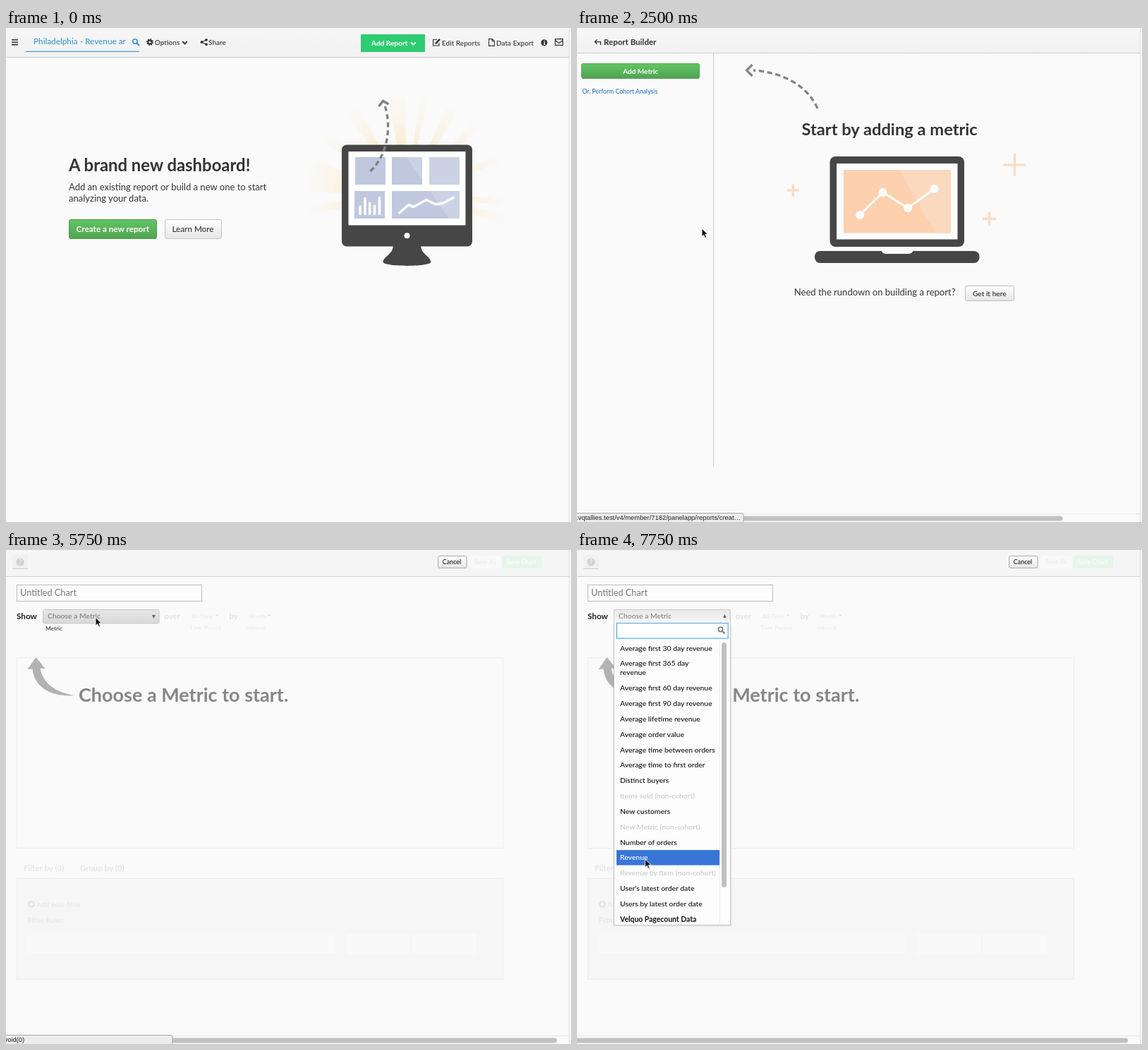
An HTML page that plays this animation: 801x700 px, repeating every 8 s.

```html
<!DOCTYPE html>
<html lang="en">
<head>
<meta charset="utf-8">
<title>Building a report</title>
<style>
html, body { margin: 0; width: 100%; height: 100%; overflow: hidden; background: #fafafa; }
svg { display: block; width: 100%; height: 100%; }
text { font-family: Lato, "Open Sans", sans-serif; }
.semi { font-weight: 500; }
.bold { font-weight: 700; }
.line { fill: none; stroke: currentColor; }
.mid { text-anchor: middle; }
.status text { font: 9.4px "Liberation Sans", Arial, sans-serif; }

.anim { animation: 8s step-end infinite; }
.dash { animation-name: dash; }
.builder { animation-name: builder; }
.chart { animation-name: chart; }
.menu { animation-name: menu; }
.hover { animation-name: hover; }
.under { animation-name: under; }
.status { animation-name: status; }
.url { animation-name: url; }
.void { animation-name: void; }
.cursor { animation-name: cursor; }
.first { animation-name: first; }
.blip { opacity: 0; animation-name: blip; animation-delay: calc((var(--s) - 32) * 250ms); }

@keyframes dash { 0% { opacity: 1 } 31.25% { opacity: 0 } }
@keyframes builder { 0% { opacity: 0 } 31.25% { opacity: 1 } 59.375% { opacity: 0 } }
@keyframes chart { 0% { opacity: 0 } 59.375% { opacity: 1 } }
@keyframes menu { 0% { opacity: 0 } 78.125% { opacity: 1 } }
@keyframes hover { 0% { opacity: 0 } 21.875% { opacity: 1 } }
@keyframes under { 0% { opacity: 0 } 50% { opacity: 1 } }
@keyframes url { 0% { opacity: 1 } 50% { opacity: 0 } }
@keyframes void { 0% { opacity: 0 } 50% { opacity: 1 } }
@keyframes first { 0% { opacity: 1 } 87.5% { opacity: 0 } }
@keyframes blip { 0% { opacity: 1 } 3.125% { opacity: 0 } }
@keyframes status {
  0% { opacity: 0 } 18.75% { opacity: .5 } 21.875% { opacity: 1 }
  37.5% { opacity: .4 } 40.625% { opacity: 0 }
  56.25% { opacity: 1 } 84.375% { opacity: .25 } 87.5% { opacity: 0 }
}
@keyframes cursor {
  0% { transform: translate(-30px, -30px) }
  6.25% { transform: translate(286px, 127px) }
  9.375% { transform: translate(258px, 172px) }
  12.5% { transform: translate(222px, 226px) }
  15.625% { transform: translate(192px, 264px) }
  18.75% { transform: translate(177px, 284px) }
  37.5% { transform: translate(172px, 268px) }
  40.625% { transform: translate(155px, 215px) }
  43.75% { transform: translate(128px, 152px) }
  46.875% { transform: translate(108px, 110px) }
  50% { transform: translate(99px, 95.5px) }
  68.75% { transform: translate(112px, 96px) }
  71.875% { transform: translate(127px, 95.5px) }
  81.25% { transform: translate(126px, 108px) }
  84.375% { transform: translate(124.5px, 124.5px) }
  87.5% { transform: translate(118px, 192px) }
  90.625% { transform: translate(108px, 302px) }
  93.75% { transform: translate(99px, 408px) }
  96.875% { transform: translate(96.5px, 438px) }
}
</style>
</head>
<body>
<svg viewBox="0 0 801 700" preserveAspectRatio="none">
  <defs>
    <linearGradient id="green" x2="0" y2="1"><stop stop-color="#62c462"/><stop offset="1" stop-color="#51a351"/></linearGradient>
    <linearGradient id="white" x2="0" y2="1"><stop stop-color="#fff"/><stop offset="1" stop-color="#e6e6e6"/></linearGradient>
    <linearGradient id="grey" x2="0" y2="1"><stop stop-color="#e6e6e6"/><stop offset="1" stop-color="#d8d8d8"/></linearGradient>
    <linearGradient id="open" x2="0" y2="1"><stop stop-color="#e8e8e8"/><stop offset="1" stop-color="#fafafa"/></linearGradient>
    <linearGradient id="bar" x2="0" y2="1"><stop stop-color="#f6f6f6"/><stop offset="1" stop-color="#f2f2f2"/></linearGradient>
    <radialGradient id="glow" gradientUnits="userSpaceOnUse" cx="0" cy="0" r="146">
      <stop offset=".5" stop-color="#fbe6c0"/><stop offset="1" stop-color="#fdf3df" stop-opacity="0"/>
    </radialGradient>
    <path id="ray" d="M0 0L150-10V10z" fill="url(#glow)"/>
    <path id="chev" d="M-3.3-1.5L0 1.8L3.3-1.5" fill="none" stroke="currentColor" stroke-width="1.9"/>
    <g id="lens" fill="none" stroke="currentColor" stroke-width="1.6"><circle cx="-1" cy="-1" r="3.2"/><path d="M1.4 1.4L5 5" stroke-width="2"/></g>
    <path id="plus" d="M-1 0H1M0-1V1" stroke="#fbdcc6" vector-effect="non-scaling-stroke" stroke-width="3.4"/>
    <clipPath id="tiles"><path d="M495 183h43v39h-43zM547 183h43v39h-43zM600 183h43v39h-43zM494 231h43v39h-43zM547 231h96v39h-96z"/></clipPath>
  </defs>

  <rect width="801" height="700" fill="#fafafa"/>

  <g class="anim dash" color="#333">
    <rect width="798" height="41" fill="url(#bar)"/>
    <path d="M0 41.5H798" stroke="#ccc"/>
    <path class="line" d="M8 16.8h9M8 20.2h9M8 23.6h9" stroke-width="1.6"/>
    <path d="M28 33.3H189" stroke="#3a9fd0" stroke-width="1.2"/>
    <text x="39" y="23.4" font-size="11.8" fill="#2c93cb">Philadelphia - Revenue ar</text>
    <use href="#lens" x="184" y="20" color="#2c93cb"/>
    <g class="line"><circle cx="204" cy="20" r="2.7" stroke-width="2.2"/><circle cx="204" cy="20" r="4.2" stroke-width="1.5" stroke-dasharray="1.7 1.6"/></g>
    <use href="#chev" x="253.5" y="20.5"/>
    <path class="line" d="M284 16.8L277.5 20L284 23.2" stroke-width="1.2"/>
    <path d="M284 16.8h0M277.5 20h0M284 23.2h0" stroke="#333" stroke-width="3.8" stroke-linecap="round"/>
    <rect x="503" y="9" width="91" height="25" fill="#2ecc71"/>
    <text class="bold" x="518" y="24.5" font-size="10.1" fill="#fff">Add Report</text>
    <use href="#chev" x="577.3" y="21.8" color="#fff"/>
    <path class="line" d="M611 16.5H605.6V25H614V21" stroke-width="1.2"/>
    <path class="line" d="M608.8 22.3L615 15.8" stroke-width="2.5"/>
    <path class="line" d="M684.6 15.6H689.4L692.4 18.6V25.4H684.6zM689.2 15.6V18.8H692.4" stroke-width="1.1"/>
    <circle cx="763" cy="20.8" r="4.5" fill="#333"/>
    <path d="M762 20h1.4v3.2M761.8 23.3h2.9M762.7 18h1.2" stroke="#fff" fill="none" stroke-width="1.1"/>
    <path class="line" d="M778.6 15.6h10.8v8.8H778.6zM778.6 17.4L784 21.4L789.4 17.4" stroke-width="1.2"/>
    <g class="semi" font-size="10.05" fill="#333">
      <text x="210.8" y="24">Options</text><text x="287" y="24">Share</text>
      <text x="618" y="24.5">Edit Reports</text><text x="695" y="24.5">Data Export</text>
    </g>

    <text class="bold" x="89" y="203" font-size="23.9" fill="#333">A brand new dashboard!</text>
    <g font-size="13.04" fill="#333">
      <text x="89" y="230">Add an existing report or build a new one to start</text>
      <text x="89" y="246.3">analyzing your data.</text>
    </g>
    <rect x="89.5" y="271.5" width="124" height="27" rx="2.5" fill="url(#green)" stroke="#4d9b4d"/>
    <rect class="anim hover" x="89.5" y="271.5" width="124" height="27" rx="2.5" fill="#51a351" stroke="#468f46"/>
    <text class="bold mid" x="151.3" y="288.8" font-size="11.7" fill="#fff">Create a new report</text>
    <rect x="225.5" y="271.5" width="80" height="27" rx="2.5" fill="url(#white)" stroke="#c4c4c4"/>
    <text class="semi mid" x="265" y="288.8" font-size="11.7" fill="#333">Learn More</text>

    <g transform="translate(568 236)" opacity=".65">
      <use href="#ray" transform="rotate(191) scale(1 2.5)"/>
      <use href="#ray" transform="rotate(171) scale(1 .7)"/>
      <use href="#ray" transform="rotate(215) scale(1 .7)"/>
      <use href="#ray" transform="rotate(237)"/>
      <use href="#ray" transform="rotate(264) scale(1 1.3)"/>
      <use href="#ray" transform="rotate(280) scale(1 .6)"/>
      <use href="#ray" transform="rotate(298) scale(1 .8)"/>
      <use href="#ray" transform="rotate(315) scale(1 .6)"/>
      <use href="#ray" transform="rotate(339) scale(1 .6)"/>
      <use href="#ray" transform="rotate(4) scale(1 .6)"/>
      <use href="#ray" transform="rotate(14) scale(1 .8)"/>
    </g>
    <path d="M549 308H588C589 322 602 323 602.5 332C598 338.5 539 338.5 534.5 332C535 323 548 322 549 308z" fill="#464646"/>
    <rect x="476" y="165.5" width="185" height="144" rx="7" fill="#464646"/>
    <rect x="485.5" y="175" width="166" height="104.5" fill="#fff"/>
    <g clip-path="url(#tiles)">
      <rect x="490" y="180" width="160" height="95" fill="#bfc8de"/>
      <path d="M568 183H650V270H628z" fill="#cbd2e3"/>
    </g>
    <g fill="none" stroke="#fff" stroke-width="3.6" stroke-linecap="round">
      <path d="M502 263.5V253M509 263.5V241.5M515.7 263.5V248M522.5 263.5V252M529.5 263.5V240.5"/>
      <path d="M557.5 262L571 250.5L577.5 253.5L596 243.5L609 250L620.5 248L634 240.5" stroke-linejoin="round"/>
    </g>
    <circle cx="568.5" cy="294.3" r="4" fill="#fff"/>
    <g class="line" color="#808080" stroke-width="3.3">
      <path d="M516.5 203C541 180 547 140 537 110" stroke-dasharray="7 4.5"/>
      <path d="M528.5 111L534.5 103.5L542.5 108"/>
    </g>
  </g>

  <g class="anim builder">
    <rect width="798" height="35" fill="url(#bar)"/>
    <path d="M0 35.5H798M193.5 36V621" stroke="#ccc"/>
    <path class="line" color="#333" d="M28.5 16.5L25.3 19.6L28.5 22.7M25.5 19.6H33.5V24" stroke-width="1.3"/>
    <text class="bold" x="38" y="24.3" font-size="11.5" fill="#333">Report Builder</text>
    <rect x="6.5" y="50.5" width="167" height="21" rx="2" fill="url(#green)" stroke="#55a555"/>
    <text class="bold mid" x="90.2" y="64.8" font-size="10" fill="#fff">Add Metric</text>
    <text x="7.5" y="93" font-size="8.7" fill="#1a6cb0">Or, Perform Cohort Analysis</text>
    <g class="anim under" fill="#124d7e">
      <text x="7.5" y="93" font-size="8.7" text-decoration="underline">Or, Perform Cohort Analysis</text>
    </g>
    <g class="line" color="#858585" stroke-width="3.3">
      <path d="M341 114C327 83 294 63 250 60" stroke-dasharray="7.5 4.5"/>
      <path d="M248.5 52L240.5 60L248.5 68"/>
    </g>
    <text class="bold" x="318.5" y="152" font-size="23.7" fill="#333">Start by adding a metric</text>
    <use href="#plus" transform="translate(620.5 194) scale(16)"/>
    <use href="#plus" transform="translate(306.3 230) scale(8.5)"/>
    <use href="#plus" transform="translate(584.5 270.5) scale(10)"/>
    <rect x="358.5" y="182" width="190.5" height="128" rx="8" fill="#464646"/>
    <rect x="368" y="192" width="171.5" height="107.5" fill="#fcfcfc"/>
    <rect x="378" y="201" width="152" height="89.5" fill="#fdd0ae"/>
    <path d="M456.5 201H530V290.5H508z" fill="#fad9be"/>
    <g fill="#fcfcfc">
      <path d="M401 265L433.5 233L469 255L506.5 228" fill="none" stroke="#fcfcfc" stroke-width="3"/>
      <circle cx="401" cy="265" r="6"/><circle cx="433.5" cy="233" r="6"/>
      <circle cx="469" cy="255" r="6"/><circle cx="506.5" cy="228" r="6"/>
    </g>
    <rect x="337" y="316" width="233.5" height="17" rx="7.5" fill="#464646"/>
    <path d="M431.5 315.5H476.5C475 319 473 320 469 320H439C435 320 433 319 431.5 315.5z" fill="#fafafa"/>
    <text x="307.8" y="379" font-size="13.04" fill="#333">Need the rundown on building a report?</text>
    <rect x="550.5" y="365.5" width="69" height="21" rx="2" fill="url(#white)" stroke="#bdbdbd"/>
    <text class="semi mid" x="584.8" y="379.8" font-size="10.2" fill="#222">Get it here</text>
    <path d="M0 688.5H798" stroke="#e6e6e6"/>
    <rect x="-10" y="691.5" width="698.5" height="7" rx="3.5" fill="#c1c1c1"/>
  </g>

  <g class="anim chart">
    <rect width="798" height="37" fill="#f5f5f5"/>
    <path d="M0 37.5H798" stroke="#d2d2d2"/>
    <rect x="9" y="7" width="22" height="19" rx="2" fill="#f0f0f0"/>
    <path d="M9 26.5H31" stroke="#ccc"/>
    <circle cx="20" cy="17" r="5.6" fill="#d2d2d2"/>
    <text class="bold mid" x="20" y="20.3" font-size="9" fill="#f4f4f4">?</text>
    <rect x="612.5" y="8.5" width="40.5" height="17" rx="2.5" fill="url(#white)" stroke="#aaa"/>
    <text class="semi mid" x="632" y="19.8" font-size="8.9" fill="#111">Cancel</text>
    <rect x="657" y="8" width="45" height="18" rx="2" fill="#f9f9f9"/>
    <text x="664" y="19.8" font-size="9" fill="#e8e8e8">Save As</text>
    <rect x="703" y="8" width="57" height="18" rx="3" fill="#e6f5ea"/>
    <text class="bold mid" x="731" y="19.8" font-size="8.7" fill="#f8fdf9">Save Chart</text>

    <rect x="15.5" y="49.5" width="262" height="23" fill="#fcfcfc" stroke="#bcbcbc"/>
    <text x="20" y="65.3" font-size="12.75" fill="#777">Untitled Chart</text>
    <text class="bold" x="15" y="98" font-size="11.7" fill="#222">Show</text>
    <rect x="52.5" y="84.5" width="164.5" height="19.5" rx="2" fill="url(#grey)" stroke="#c4c4c4"/>
    <text x="59" y="97.3" font-size="10.4" fill="#777">Choose a Metric</text>
    <path d="M207 92h5l-2.5 5z" fill="#666"/>
    <text class="semi" x="56" y="114.3" font-size="8.3" fill="#333">Metric</text>
    <g fill="#e2e2e2">
      <g class="bold" font-size="11.3"><text x="224.5" y="98">over</text><text x="316.5" y="98">by</text></g>
      <g font-size="8.4" fill="#e8e8e8">
        <text x="263" y="96.5">All-Time</text><text x="344" y="96.5">Month</text>
        <text x="260" y="112.5">Time Period</text><text x="340" y="112.5">Interval</text>
      </g>
      <path d="M296.5 91.5h5l-2.5 3zM371 91.5h5l-2.5 3z"/>
    </g>
    <rect x="15.5" y="152.5" width="689" height="270" fill="none" stroke="#eee"/>
    <path d="M42.5 152L56 168.5L48.5 167.5C52 188 69 202 98 206C68 209 40 197 37.5 168.5L30.5 169z" fill="#b2b2b2"/>
    <text class="bold" x="103" y="215" font-size="27" fill="#868686">Choose a Metric to start.</text>
    <g class="bold" font-size="11.5" fill="#e5e5e5"><text x="25" y="455">Filter by (0)</text><text x="105" y="455">Group by (0)</text></g>
    <rect x="15.5" y="465.5" width="689" height="143" fill="#f6f6f6" stroke="#ededed"/>
    <circle cx="36" cy="502" r="5" fill="#e4e4e4"/>
    <path d="M33 502h6M36 499v6" stroke="#f6f6f6" stroke-width="1.8"/>
    <g font-size="10.25" fill="#e4e4e4"><text x="43" y="506">Add new filter</text><text x="31" y="528">Filter Rules:</text></g>
    <path d="M30 546H467V571H30zM482 544H573V573H482zM575 544H667V573H575z" fill="#f9f9f9"/>
    <path d="M0 688.5H798" stroke="#e6e6e6"/>
    <rect x="-10" y="691.5" width="791" height="7" rx="3.5" fill="#c1c1c1"/>

    <g class="anim menu">
      <rect x="51" y="106" width="168.5" height="428" rx="3" fill="#000" opacity=".05"/>
      <rect x="52.5" y="84.5" width="164.5" height="22" rx="2" fill="url(#open)" stroke="#ccc"/>
      <text x="59" y="97.3" font-size="10.4" fill="#777">Choose a Metric</text>
      <path d="M207 96h5l-2.5-5z" fill="#666"/>
      <path d="M52.5 104V531.5H217.5V104" fill="#fdfdfd" stroke="#c6c6c6"/>
      <rect x="56.5" y="104" width="157.5" height="21" fill="#fff" stroke="#b4daf2" stroke-width="2.6"/>
      <rect x="56.5" y="104" width="157.5" height="21" fill="#fff" stroke="#62b2e0"/>
      <use href="#lens" x="204.5" y="113.5" color="#777"/>
      <path d="M202.5 128V529" stroke="#ececec"/>
      <rect x="205" y="131" width="7" height="347" rx="3.5" fill="#c1c1c1"/>
      <g id="rows" font-size="10.4"></g>
    </g>
  </g>

  <path d="M798.5 0V700" stroke="#dedede"/>
  <rect x="799" width="2" height="700" fill="#f8f8f8"/>

  <g class="anim status">
    <path d="M-1 687.5H233Q236 687.5 236 690V701H-1z" fill="#ececec" stroke="#a8a8a8"/>
    <text class="anim url" x="-1" y="697" fill="#222">.vqtallies.test/v4/member/7182/panelapp/reports/creat…</text>
    <text class="anim void" x="-2.5" y="697" fill="#222">void(0)</text>
  </g>

  <path class="anim cursor" d="M0 0V11.8L2.7 9.3L4.6 13.5L6.6 12.6L4.8 8.5H8.4z" fill="#111" stroke="#fff" stroke-width=".9"/>
</svg>
<script>
const rows = document.getElementById('rows');
const labels = [
  'Average first 60 day revenue', 'Average first 90 day revenue', 'Average lifetime revenue',
  'Average order value', 'Average time between orders', 'Average time to first order',
  'Distinct buyers', 'Items sold (non-cohort)', 'New customers', 'New Metric (non-cohort)',
  'Number of orders', 'Revenue', 'Revenue by Item (non-cohort)', "User's latest order date",
  'Users by latest order date', 'Velquo Pagecount Data'
];
// Steps of 250 ms at which the pointer passes over a row.
const passed = { 0: 28, 5: 29, 10: 30, 11: 31 };
const rowY = i => 195.5 + 21.83 * i;

const label = (y, text, fill, weight = 500) =>
  `<text x="61" y="${y + 3.7}" fill="${fill}" font-weight="${weight}">${text}</text>`;
const picked = (y, text, attrs) =>
  `<g ${attrs}><rect x="56" y="${y - 10.5}" width="146" height="21.5" fill="#3875d7"/>${label(y, text, '#fff')}</g>`;

const top30 = 'Average first 30 day revenue';
let html = label(139, top30, '#111') + picked(139, top30, 'class="anim first"') +
  label(160.3, 'Average first 365 day', '#111') + label(173.3, 'revenue', '#111');
labels.forEach((text, i) => {
  const off = text.includes('non-cohort');
  html += label(rowY(i), text, off ? '#c8c8c8' : '#111', i === labels.length - 1 ? 700 : 500);
  if (i in passed) html += picked(rowY(i), text, `class="anim blip" style="--s:${passed[i]}"`);
});
rows.innerHTML = html;
</script>
</body>
</html>
```
